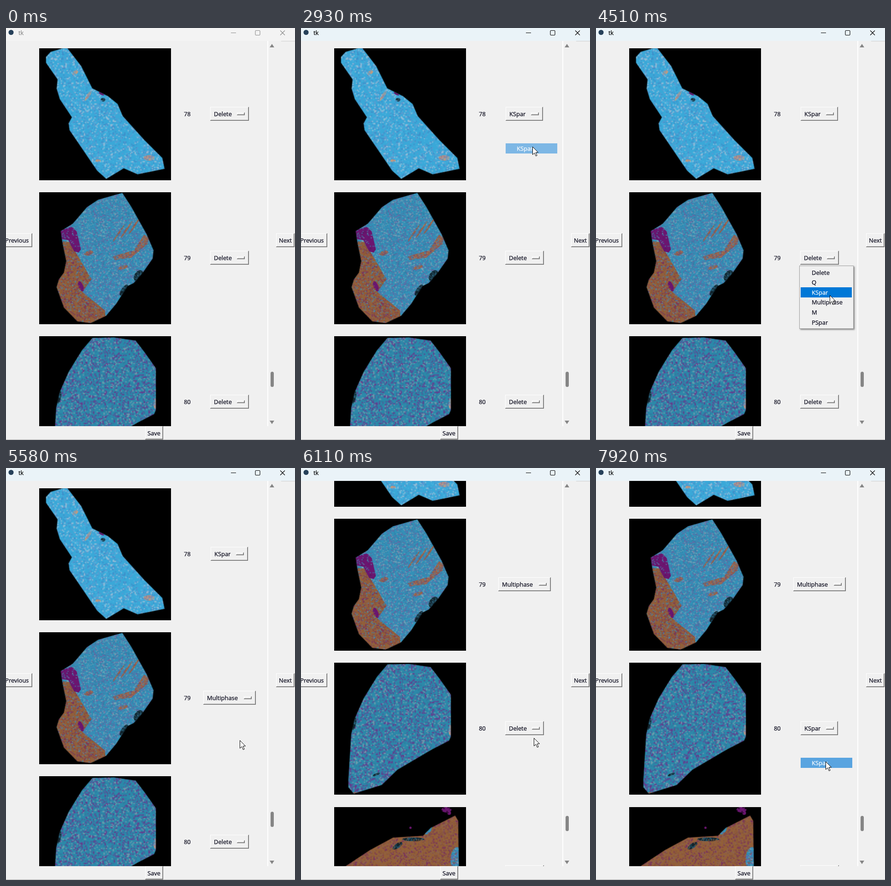
These frames come from a looping animation (627 by 893 pixels, 7.99 s). An HTML page with a canvas:

```html
<!DOCTYPE html>
<html lang="en">
<head>
<meta charset="utf-8">
<title>tk</title>
<style>
  html, body { margin: 0; width: 100%; height: 100%; overflow: hidden; background: #f0f0f0; }
  canvas { display: block; width: 627px; height: 893px; }
</style>
</head>
<body>
<canvas id="stage" width="627" height="893"></canvas>
<script>
const LOOP = 7990, W = 627, H = 893, TOP = 28, BOTTOM = 863, TILE = 286;
const FACE = '#f0f0f0', INK = '#08081a', BLUE = '#0078d7';
const FONT = '12.9px "Open Sans", "Noto Sans", sans-serif';
const ITEMS = ['Delete', 'Q', 'KSpar', 'Multiphase', 'M', 'PSpar'];
const BUTTON_WIDTH = { Delete: 84, KSpar: 81, Multiphase: 114 };
const ROW_STEP = 21.6;

// One menu per row, in order; times in ms.
const MENUS = [
  { click: 1500, pick: 2720, close: 2810, choice: 2 },
  { click: 3880, pick: 5120, close: 5250, choice: 3 },
  { click: 6910, pick: 7710, close: 7845, choice: 2 }
];
const SCROLLS = [5720, 5790, 6110];
const ENTRY = { at: 460, x: 588, y: 721 };
const MOVES = [
  { from: 460, to: 1230, x: 480, y: 212 },
  { from: 1230, to: 1370, x: 504, y: 187 },
  { from: 1850, to: 2460, x: 502, y: 257 },
  { from: 2960, to: 3610, x: 506, y: 504 },
  { from: 3610, to: 3680, x: 505, y: 498 },
  { from: 4010, to: 4650, x: 507, y: 590 },
  { from: 5980, to: 6110, x: 505, y: 585 },
  { from: 6310, to: 6710, x: 503, y: 571 },
  { from: 6910, to: 7640, x: 498, y: 636 }
];

const g = document.getElementById('stage').getContext('2d');
const clamp = v => Math.max(0, Math.min(1, v));
const ease = k => k * k * (3 - 2 * k);

function pointerAt(t) {
  let { x, y } = ENTRY;
  for (const m of MOVES) {
    const k = ease(clamp((t - m.from) / (m.to - m.from)));
    x += (m.x - x) * k;
    y += (m.y - y) * k;
  }
  return { x: Math.round(x), y: Math.round(y) };
}

function rect(x, y, w, h, color) {
  g.fillStyle = color;
  g.fillRect(x, y, w, h);
}

function text(s, x, centerY, color = INK, align = 'left') {
  g.font = FONT;
  g.textAlign = align;
  g.fillStyle = g.strokeStyle = color;
  g.lineWidth = .25;
  g.fillText(s, x, centerY + 4.5);
  g.strokeText(s, x, centerY + 4.5);
}

function poly(...points) {
  const p = new Path2D();
  for (let i = 0; i < points.length; i += 2) p.lineTo(points[i], points[i + 1]);
  p.closePath();
  return p;
}

function blob(x, y, rx, ry = rx, turn = 0) {
  const p = new Path2D();
  p.ellipse(x, y, rx, ry, turn, 0, Math.PI * 2);
  return p;
}

let seed = 78;
function random() {
  seed = seed * 16807 % 2147483647;
  return seed / 2147483647;
}

// Main colour, its share, then the colours mixed into it.
const MINERALS = {
  bright: ['#3aa8d8', .62, '#4cb4e0', '#5f9ad0', '#9cc0d8', '#3f8cc8'],
  blue: ['#3391b8', .55, '#4a7fae', '#6a62a0', '#78a4b6', '#2f7fa6'],
  deep: ['#2c89aa', .58, '#30799f', '#5a4f98', '#68358a', '#729fae'],
  brown: ['#935f38', .6, '#84503f', '#77305f', '#8c6350'],
  rust: ['#966048', .6, '#a5765c', '#6a4a78', '#557a98'],
  tan: ['#c09a80', .6, '#8a80a0', '#6e9cc0'],
  plum: ['#6b1570', .9, '#5c1664'],
  dark: ['#11242c', .6, '#26566c']
};

function newCanvas(size) {
  const canvas = document.createElement('canvas');
  canvas.width = canvas.height = size;
  return canvas;
}

// Seeded cells, softened when enlarged; gaps let the layer below show through.
function grain(p, area, kind, cell, density = .92) {
  const [main, share, ...mixed] = MINERALS[kind];
  const size = Math.ceil(TILE / cell), noise = newCanvas(size), n = noise.getContext('2d');
  for (let i = 0; i < size * size; i++) {
    if (random() > density) continue;
    n.fillStyle = random() < share ? main : mixed[random() * mixed.length | 0];
    n.fillRect(i % size, i / size | 0, 1, 1);
  }
  p.save();
  p.clip(area);
  p.drawImage(noise, 0, 0, size * cell, size * cell);
  p.restore();
}

function makeTile(outline, base, cell, patches, outside = []) {
  const tile = newCanvas(TILE), p = tile.getContext('2d');
  p.fillRect(0, 0, TILE, TILE);
  p.save();
  p.clip(outline);
  grain(p, outline, base, cell, 1);
  for (const [kind, area] of patches) grain(p, area, kind, cell);
  p.strokeStyle = 'rgba(0,0,0,.3)';
  p.lineWidth = 2;
  p.stroke(outline);
  p.restore();
  for (const [kind, area] of outside) grain(p, area, kind, cell);
  return tile;
}

const streaks = [0, 1, 2].map(i => ['rust', blob(173 + 17 * i, 89 - 8 * i, 22, 2, -.97)]);

const TILES = [
  makeTile(poly(
    15,19, 25,8, 52,0, 62,0, 92,39, 109,73, 116,87, 150,104, 171,121, 182,147, 228,198, 268,238,
    273,262, 214,274, 184,261, 146,284, 126,266, 66,178, 64,163, 71,150, 45,111, 38,88, 40,68, 15,32
  ), 'bright', 2.5, [
    ['tan', blob(79, 53, 7, 4, -.6)], ['tan', blob(107, 103, 13, 3, -1)],
    ['plum', blob(135, 99, 7, 2, .5)], ['dark', blob(139, 112, 5, 4)],
    ['tan', blob(239, 238, 12, 6)], ['tan', blob(128, 244, 6, 3)]
  ]),
  makeTile(poly(
    47,84, 73,68, 104,32, 128,16, 181,1, 201,32, 234,91, 249,126, 247,144, 226,174, 206,197,
    192,204, 168,242, 146,268, 112,284, 83,280, 54,250, 38,206, 43,189, 54,174, 59,149, 50,106
  ), 'blue', 2, [
    ['brown', poly(30,104, 66,108, 91,149, 114,189, 94,216, 143,256, 146,290, 30,290)],
    ['plum', poly(47,82, 71,75, 82,85, 91,124, 86,131, 76,128, 64,104, 48,101)],
    ['plum', blob(91, 204, 5, 12, -.4)],
    ['rust', poly(160,139, 206,126, 228,92, 238,99, 236,112, 200,142, 163,147)],
    ...streaks,
    ['rust', blob(108, 132, 10, 5, -.3)], ['rust', blob(182, 163, 11, 4, -.3)],
    ['dark', blob(216, 181, 9, 13, .6)], ['dark', blob(184, 212, 5, 14, .6)]
  ]),
  makeTile(poly(
    31,252, 37,155, 45,120, 64,77, 93,30, 116,3, 163,2, 210,9, 230,35, 254,69, 254,160, 250,169,
    213,188, 138,232, 104,265, 43,284, 31,270
  ), 'deep', 2.5, [
    ['dark', blob(44, 132, 4, 14, .2)], ['dark', blob(92, 242, 8, 3, -.4)],
    ['tan', blob(252, 146, 3, 12)], ['rust', blob(48, 282, 12, 2)]
  ]),
  makeTile(poly(
    25,128, 78,93, 128,66, 193,62, 210,45, 263,18, 270,30, 272,190, 25,190
  ), 'brown', 2.2, [
    ['dark', blob(138, 84, 12, 5, -.6)], ['dark', blob(172, 70, 24, 4)],
    ['blue', blob(205, 49, 6, 12, .6)], ['blue', blob(267, 115, 14, 28)]
  ], [
    ['plum', blob(244, 6, 11, 6)], ['plum', blob(250, 13, 4)], ['plum', blob(166, 45, 2.5)]
  ])
];

function bevel(x, y, w, h) {
  rect(x, y, w, h, '#696969');
  rect(x, y, w - 1, h - 1, '#fff');
  rect(x + 1, y + 1, w - 2, h - 2, '#a0a0a0');
  rect(x + 1, y + 1, w - 3, h - 3, FACE);
}

function optionButton(value, centerY) {
  const w = BUTTON_WIDTH[value], x = Math.floor(485 - w / 2);
  bevel(x, centerY - 15, w, 30);
  text(value, x + 8, centerY);
  bevel(x + w - 26, centerY - 3, 17, 6);
}

function titleBar(t) {
  rect(0, 0, W, TOP, '#f3f3f3');
  g.globalAlpha = clamp((t - 1560) / 140);
  rect(0, 0, W, TOP, '#eaf3f8');
  g.globalAlpha = 1;
  g.fillStyle = '#27415a';
  g.fill(blob(11, 9.5, 5.5));
  const ink = t >= MENUS[0].click ? '#000' : '#8c8c8c';
  text('tk', 27, 10, ink);
  g.strokeStyle = ink;
  g.lineWidth = 1.1;
  g.beginPath();
  g.moveTo(488, 10.5); g.lineTo(499, 10.5);
  g.roundRect(541, 5.5, 10, 10, 1.5);
  g.moveTo(595, 5.5); g.lineTo(605, 15.5);
  g.moveTo(605, 5.5); g.lineTo(595, 15.5);
  g.stroke();
}

function scrollBar(scroll) {
  rect(567, TOP, 2, BOTTOM - TOP, '#fff');
  rect(597, TOP, 30, 1, '#cfcfcf');
  g.fillStyle = '#858585';
  g.fill(poly(572,42, 577,34.5, 582,42));
  g.fill(poly(572,851, 577,858.5, 582,851));
  g.beginPath();
  g.roundRect(574, 745 + Math.round(scroll * .037), 7, 33, 3.5);
  g.fill();
}

const rowCenter = (row, scroll) => 186 + 312 * row - scroll;

function list(t, scroll) {
  g.save();
  g.beginPath();
  g.rect(0, TOP, W, BOTTOM - TOP);
  g.clip();
  TILES.forEach((tile, i) => {
    const y = rowCenter(i, scroll), menu = MENUS[i];
    g.drawImage(tile, 71.5, 43.5 + 312.4 * i - scroll);
    text(String(78 + i), 386, y);
    optionButton(menu && t >= menu.close ? ITEMS[menu.choice] : 'Delete', y);
  });
  g.restore();
}

function dropDown(menu, row, t, scroll, tip) {
  const top = rowCenter(row, scroll) + 18, open = menu.click + 60;
  const rowTop = i => top + 3 + ROW_STEP * i;
  if (t < open) return;
  g.save();
  if (t < menu.close) {
    g.shadowColor = 'rgba(0,0,0,.45)';
    g.shadowBlur = 3;
    g.shadowOffsetX = g.shadowOffsetY = 2;
    rect(441, top - 1, 118, 137, FACE);
    g.shadowColor = 'transparent';
    g.globalAlpha = clamp((t - open) / 60);
    g.strokeStyle = '#a0a0a0';
    g.lineWidth = 1;
    g.strokeRect(441.5, top - .5, 117, 136);
    const hot = Math.floor((tip.y - top - 3) / ROW_STEP);
    ITEMS.forEach((item, i) => {
      if (i === hot) rect(444, Math.round(rowTop(i)), 111, 22, BLUE);
      text(item, 468, rowTop(i) + 11, i === hot ? '#fff' : INK);
    });
  } else {
    // The chosen entry lingers and fades after the list closes.
    const alpha = clamp(.88 - .0033 * (t - menu.close));
    g.globalAlpha = alpha;
    rect(444, Math.round(rowTop(menu.choice)), 112, 22, BLUE);
    g.globalAlpha = Math.ceil(alpha);
    text(ITEMS[menu.choice], 468, rowTop(menu.choice) + 11, `rgb(255 255 255 / ${clamp(alpha * 3)})`);
  }
  g.restore();
}

const ARROW = poly(0,0, 0,17, 4,13.3, 7,20, 9.6,18.9, 6.7,12.4, 12,12.2);

function pointer(t, tip) {
  const pressed = MENUS.some(m => [m.click, m.pick].some(s => t >= s && t < s + 130));
  if (pressed) {
    g.fillStyle = 'rgba(250,240,50,.75)';
    g.fill(blob(tip.x, tip.y, 13.5));
  }
  g.save();
  g.translate(tip.x + .5, tip.y + .5);
  g.fillStyle = '#fff';
  g.fill(ARROW);
  g.strokeStyle = '#000';
  g.lineWidth = 1;
  g.stroke(ARROW);
  g.restore();
}

function draw(t) {
  const scroll = 82 * SCROLLS.filter(s => t >= s).length;
  const tip = pointerAt(t);
  rect(0, 0, W, H, FACE);
  list(t, scroll);
  titleBar(t);
  scrollBar(scroll);
  bevel(-10, 445, 67, 30);
  text('Previous', 49.5, 460, INK, 'right');
  bevel(586, 445, 40, 30);
  text('Next', 592, 460);
  rect(0, 892, W, 1, '#a9a9a9');
  bevel(302, 863, 39, 29);
  text('Save', 307, 878);
  MENUS.forEach((menu, row) => dropDown(menu, row, t, scroll, tip));
  if (t >= ENTRY.at) pointer(t, tip);
}

const start = performance.now();
function tick() {
  draw((performance.now() - start) % LOOP);
  requestAnimationFrame(tick);
}
tick();
</script>
</body>
</html>
```
